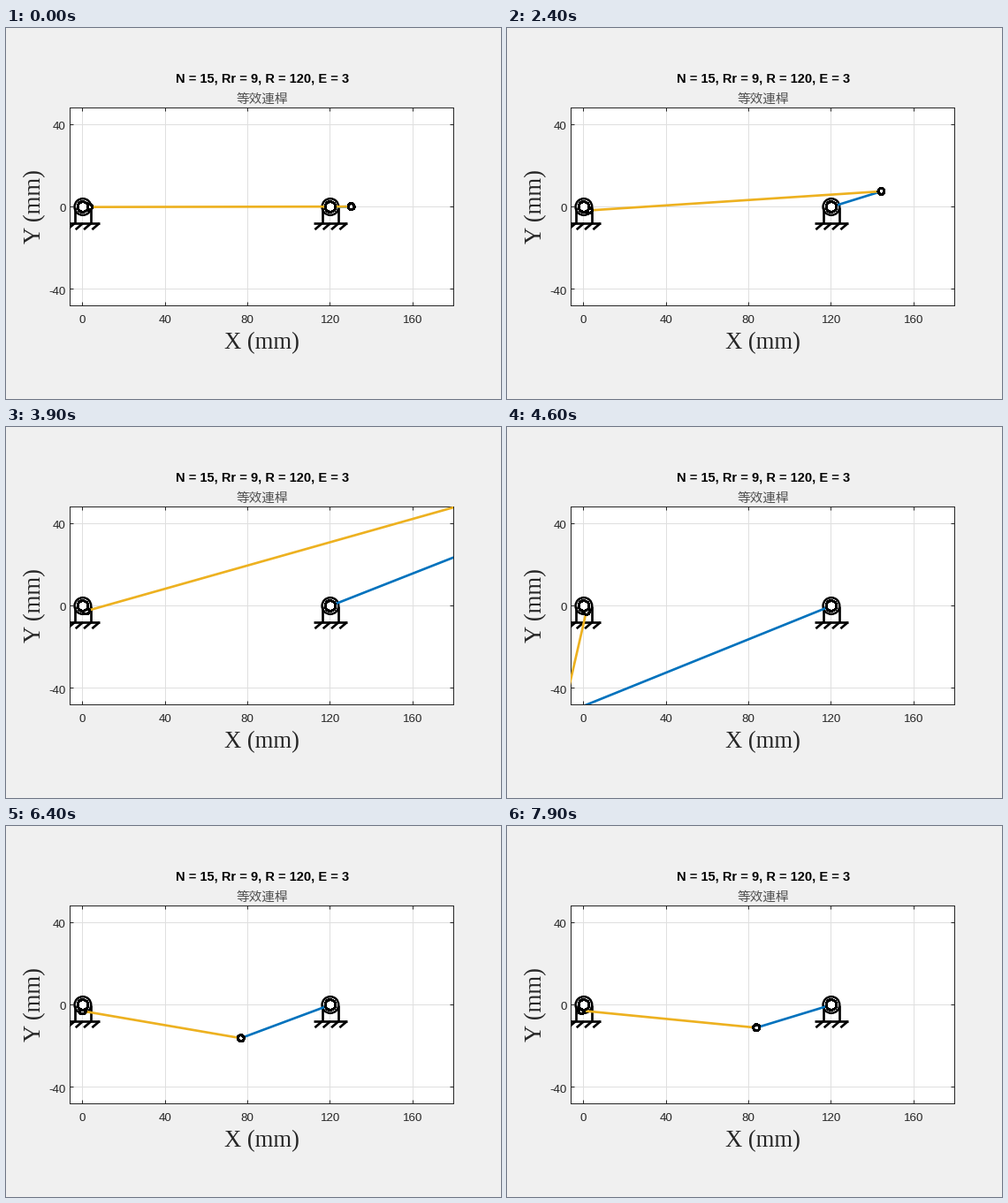
Write a matplotlib script that moves like this. It is 560 px wide and 420 px high and loops after 8000 ms.

```python
import numpy as np
import matplotlib.pyplot as plt
from matplotlib.animation import FuncAnimation
from matplotlib.patches import Circle
from matplotlib.transforms import ScaledTranslation

W, H, DPI = 560, 420, 100
PX = 72 / DPI                     # points per pixel
FRAMES, INTERVAL = 80, 100
N, R, E = 15, 120, 3              # rollers, roller circle radius, eccentricity
STEP = np.radians(1.4)            # crank turn per frame
DARK, BLUE, YELLOW = "#262626", "#0072BD", "#EDB120"

fig = plt.figure(figsize=(W / DPI, H / DPI), dpi=DPI, facecolor="#f0f0f0")
ax = fig.add_axes([72.3 / W, 1 - 314.1 / H, 434 / W, 224 / H])
ax.set(xlim=(-6, 180), ylim=(-48, 48),
       xticks=range(0, 161, 40), yticks=(-40, 0, 40))
ax.set_axisbelow(True)
ax.grid(color="#dfdfdf", lw=PX)
ax.tick_params(direction="in", length=4.3 * PX, width=PX, color=DARK,
               top=True, right=True, labelbottom=False, labelleft=False)
for spine in ax.spines.values():
    spine.set(color=DARK, linewidth=PX)

# Frame and grid snap to whole pixels; the mechanism sits half a pixel off.
shift = ScaledTranslation(0.6 / DPI, -0.4 / DPI, fig.dpi_scale_trans)
data = ax.transData + shift


def label(x, y, s, size, font="Liberation Sans", ha="center", color=DARK, **kw):
    fig.text(x / W, 1 - y / H, s, fontsize=size * PX, family=font, ha=ha,
             va=kw.pop("va", "baseline"), color=color, **kw)


def stroke(x, y, color="black", width=2.67, z=3):
    return ax.plot(x, y, color=color, lw=width * PX, zorder=z,
                   solid_capstyle="butt", transform=data)[0]


def ring(x, y, r, width, z, fill="white", smooth=False):
    c = Circle((x, y), r, fc=fill, ec="black", lw=width * PX, zorder=z,
               antialiased=smooth, transform=data)
    return ax.add_patch(c)


def support(x):
    ring(x, 0, 4, 2.5, 3, "none", smooth=True)
    for side in (-4, 4):
        stroke([x + side] * 2, [0, -8])
    stroke([x - 8, x + 8], [-8, -8])
    for top in (-4, 0, 4, 8):
        stroke([x + top, x + top - 3.5], [-8, -11])
    ring(x, 0, 2.5, 2, 6)


def linkage(phi):
    """Eccentric centre and centre of curvature (Euler-Savary)."""
    d = np.array([np.cos(phi), np.sin(phi)])
    pitch = E * N * d
    to_roller = np.array([R, 0]) - pitch
    dist = np.hypot(*to_roller)
    u = to_roller / dist
    k = 1 / (E * (N - 1)) - 1 / (E * N)
    return E * d, pitch + u / (1 / dist - k / (u @ d))


label(290, 62, "N = 15, Rr = 9, R = 120, E = 3", 14.67, color="black",
      weight="bold")
label(290, 85, "等效連桿", 14.67, "Noto Sans CJK JP", color="#505050",
      weight="light")
label(289.5, 363.6, "X (mm)", 26.67, "Liberation Serif")
label(45, 202.5, "Y (mm)", 26.67, "Liberation Serif", rotation=90,
      ha="right", va="center")
for v in range(0, 161, 40):
    label(86.6 + v * 7 / 3, 334, str(v), 13.33)
for v in (-40, 0, 40):
    label(67.5, 208.5 - v * 7 / 3, str(v), 13.33, ha="right")

support(0)
support(R)
rocker = stroke([], [], BLUE, z=4)
coupler = stroke([], [], YELLOW, z=4.1)
joints = [ring(0, 0, 1.5, 2, 5) for _ in range(2)]


def update(i):
    c, k = linkage(-STEP * (i + 1))
    rocker.set_data([R, k[0]], [0, k[1]])
    coupler.set_data([c[0], k[0]], [c[1], k[1]])
    for joint, p in zip(joints, (c, k)):
        joint.center = tuple(p)
    return rocker, coupler, *joints


anim = FuncAnimation(fig, update, frames=FRAMES, interval=INTERVAL,
                     repeat=True, repeat_delay=0, blit=False)
plt.show()
```
